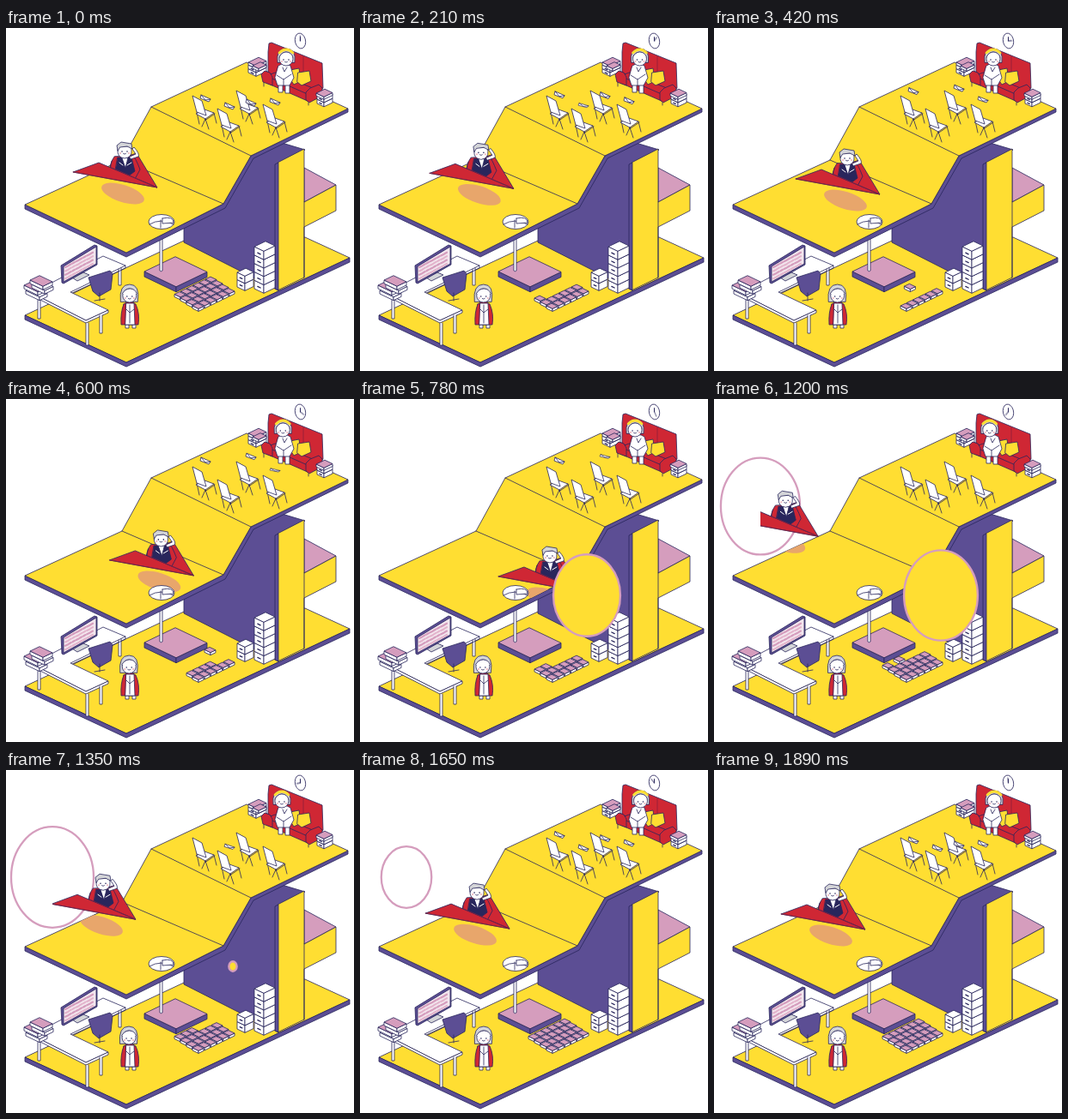
An HTML page that plays this animation: 405 px wide and 400 px high, repeating every 1.92 s.

```html
<!DOCTYPE html>
<html lang="en">
<head>
<meta charset="utf-8">
<title>Isometric office</title>
<style>
html, body { margin: 0; width: 100%; height: 100%; overflow: hidden; background: #fff; }
svg { display: block; width: 405px; height: 400px; }
.ink { fill: none; stroke: #29265c; stroke-width: .8; stroke-linecap: round; stroke-linejoin: round; }
.minute { animation: turn 1.92s linear infinite; }
@keyframes turn { to { transform: rotate(360deg); } }
</style>
</head>
<body>
<svg id="stage" viewBox="0 0 405 400" xmlns="http://www.w3.org/2000/svg"></svg>
<script>
const LOOP = 1920, STEP = 30;
const YELLOW = '#ffde32', PURPLE = '#5c4e94', PINK = '#d59dbd', RED = '#cf2734',
      INK = '#29265c', WHITE = '#fff', GREY = '#d4d5d8', ORANGE = '#e8a66b';
const SLAB = '22,206 135,154 169,92 280,40 398,94 285,149 253,205 140,262';

const poly = (pts, fill, line = INK, w = .8) =>
  `<polygon points="${pts}" fill="${fill}" stroke="${line}" stroke-width="${w}" stroke-linejoin="round"/>`;
const path = (d, fill = 'none', line = INK, w = .8) =>
  `<path d="${d}" fill="${fill}" stroke="${line}" stroke-width="${w}" stroke-linecap="round" stroke-linejoin="round"/>`;
const oval = (x, y, rx, ry, fill, line = INK, w = .8) =>
  `<ellipse cx="${x}" cy="${y}" rx="${rx}" ry="${ry}" fill="${fill}" stroke="${line}" stroke-width="${w}"/>`;
const group = (x, y, body, id = '') => `<g ${id && `id="${id}"`} transform="translate(${x} ${y})">${body}</g>`;

// Isometric box: left corner at x,y; a runs down-right, b runs up-right, h goes down.
function box(x, y, a, b, h, top = WHITE, left = WHITE, right = left) {
  const k = .48;
  const p = (u, v, d = 0) => `${x + u + v},${y + k * (u - v) + d}`;
  return poly([p(0, 0), p(a, 0), p(a, 0, h), p(0, 0, h)].join(' '), left) +
    poly([p(a, 0), p(a, b), p(a, b, h), p(a, 0, h)].join(' '), right) +
    poly([p(0, 0), p(0, b), p(a, b), p(a, 0)].join(' '), top);
}

function cabinet(x, y, a, b, h, drawers) {
  let s = '';
  for (let i = drawers - 1; i >= 0; i--) {
    const d = h / drawers, yy = y + i * d;
    s += box(x, yy, a, b, d);
    s += path(`M${x + a * .35} ${yy + a * .25 + d * .45}l${a * .3} ${a * .15}`, 'none', INK, 1.3);
  }
  return s;
}

function face(x, y) {
  return `<g fill="${INK}"><circle cx="${x - 3}" cy="${y}" r=".8"/><circle cx="${x + 3}" cy="${y}" r=".8"/></g>` +
    `<g fill="#efb6bd"><circle cx="${x - 5}" cy="${y + 2}" r="1.1"/><circle cx="${x + 5}" cy="${y + 2}" r="1.1"/></g>` +
    path(`M${x - 1.5} ${y + 2.5}q1.5 1.4 3 0`);
}

function building() {
  return poly('22,335 207,248 348,244 400,268 140,390', YELLOW) +
    poly('22,335 140,390 400,268 400,273 140,395 22,340', PURPLE) +
    poly('207,226 252,206 285,149 318,133 348,142 317,158 317,306 207,250', PURPLE) +
    poly('347,163 384,183 347,203', PINK) +
    poly('316,157 347,141 347,203 384,183 384,213 347,232 347,291 316,306', YELLOW) +
    poly('313,159 317,157 317,306 313,304', PURPLE) +
    path('M347 203V291');
}

function slab() {
  return poly('22,206 140,262 253,205 285,149 398,94 398,98 288,152 255,210 140,267 22,211', PURPLE) +
    poly(SLAB, YELLOW) + path('M135 154L253 205M169 92L285 149');
}

function desk() {
  const leg = (x, y, h) => path(`M${x} ${y}v${h}h3v-${h}`, WHITE);
  let dashes = '';
  for (let r = 0; r < 4; r++)
    for (let c = 0; c < 8; c++)
      dashes += path(`M${69 + c * 4.2} ${279 + r * 4.4 - c * 2.25}l${c % 3 ? 2.6 : 3.2} -1.5`, 'none', r % 2 ? '#e3b4cc' : PINK, 2.2);
  const chair = poly('96,291 121,283 124,287 122,305 108,313 101,307', PURPLE) + path('M109 309V318M103 318L115 316');
  return leg(131, 278, 22) + leg(37, 312, 27) +
    poly('30,309 113,266 139,277 75,308 119,329 93,341', WHITE) +
    poly('30,309 93,341 119,329 119,332 93,344 30,312', WHITE) +
    path('M139 277v3L79 309') + chair +
    leg(109, 335, 21) + leg(93, 344, 26) +
    poly('77,291 90,285 97,288 83,295', GREY) +
    poly('64,277 103,253 106,254 106,276 67,298 65,297', PURPLE) +
    poly('67,278 105,255 105,275 67,296', '#f3e6ee') + dashes +
    box(23, 306, 16, 9, 4, WHITE) + box(21, 300, 16, 11, 4, PINK) +
    box(30, 299, 15, 10, 4, WHITE) + box(28, 294, 15, 11, 4, PINK);
}

function visitor() {
  return path('M139 340v10h4v-9M147 341v9h4v-10', WHITE) +
    path('M137 322Q144 316 151 322Q156 333 154 346H134Q133 332 137 322Z', RED) +
    path('M140 321H149L150 346H139Z', WHITE) + path('M144 323v21M140 328l4 4 5-4') +
    group(0, 0, path('M133 319Q131 299 143.500 299Q156 299 153 319Z', GREY) +
      oval(143.500, 312, 8, 8, WHITE) +
      path('M135 310Q138 304 144 304Q150 304 152 310', WHITE) + face(143.500, 313), 'visitorHead');
}

function sofa() {
  return cabinet(282, 43, 9, 12, 9, 2) + box(282, 40, 9, 12, 3, PINK) + box(287, 44, 7, 9, 3, PINK) +
    poly('305,28 306,18 309,17 368,41 369,70 363,77 305,52', RED) +
    path('M325 24V53M346 33V63', 'none', '#8d1f3b') +
    poly('303,56 313,52 364,73 353,83', RED) +
    poly('303,56 353,78 353,86 303,64', RED) +
    poly('297,54 301,50 307,52 310,57 310,67 299,63', RED) +
    poly('349,75 354,70 364,66 368,70 368,79 353,87 349,84', RED) +
    path('M300 64v4M352 87v3M366 80v3') +
    path('M331 49l10-2 2 15-8 4-4-6Z', YELLOW) + path('M340 52l13-2 2 12-11 5-5-4Z', YELLOW) +
    cabinet(362, 78, 8, 10, 10, 2) + box(361, 76, 9, 10, 3, PINK);
}

function sitter() {
  return path('M317 62v13h5V63M325 64v12h5V62', WHITE) +
    path('M317 44Q324 39 331 44L335 58 330 67H316L313 58Z', WHITE) +
    path('M315 55L323 60 332 54M322 46l2 5 3-5M323 60v7') +
    group(0, 0, path('M314 40Q312 24 324 24Q336 24 334 40Z', GREY) +
      path('M316 29Q324 21 332 29', 'none', YELLOW, 2.6) +
      oval(324, 36, 8, 8, WHITE) + path('M316 34Q319 28 324 28Q330 28 332 34', WHITE) + face(324, 37), 'sitterHead');
}

function clock() {
  return `<g transform="translate(342.500 15) skewY(12)">${oval(0, 0, 6.2, 8.8, WHITE)}` +
    `${path('M0 0V-4.500', 'none', INK, 1)}<g transform="scale(.72 1)"><g class="minute">${path('M0 0V-6', 'none', INK, 1)}</g></g></g>`;
}

const seat = (x, y) => group(x, y,
  path('M5 19L8 33M15 27L19 39M25 20L28 32M15 27L11 36') +
  poly('4,21 14,16 25,20 15,27', WHITE) + poly('0,0 11,6 16,23 5,19', WHITE) + path('M15 27v1.500L26 21'));

function pilot() {
  return poly('152,146 176,186 120,166 123,155', RED) +
    path('M126 150Q120 158 122 170L149 178L156 165Q151 152 148 149Z', RED) +
    path('M130 151H146L150 167L142 173L127 168Z', INK) +
    path('M135 151h7l-3 12Z', WHITE) + path('M137 153l3 2M132 157l4 3M141 160l5-3', 'none', WHITE, 1) +
    path('M145 153L154 150Q156 147 149 139L147 141L151 147L144 150Z', WHITE) +
    path('M130 142Q129 151 138 152Q147 151 146 142L145 138H131Z', WHITE) +
    path('M130 143L129 137L134 133L146 135L147 141L141 138L133 139Z', GREY) +
    face(138, 144) +
    poly('78,168 108,157 176,186', RED) + path('M78 168L176 186L123 163', 'none', '#7d2146');
}

const chairs = [[268, 73], [217, 79], [299, 89], [246, 94]];
// x, resting y, raised y, fade-out time, return time
const notes = [[232, 82, 72, 1110, 1530], [260, 91, 89, 360, 1290], [285, 87, 67, 900, 1440], [313, 86, 83, 690, 1410]];
const cells = [];
for (let r = 3; r >= 0; r--) for (let c = 5; c >= 0; c--) cells.push({ i: r * 6 + c, x: 223 + c * 7.2 - r * 7, y: 324 - c * 3.5 - r * 4.5 });

document.getElementById('stage').innerHTML = `<defs>
  <clipPath id="gate"><rect id="gateBox" y="0" height="400"/></clipPath>
  <clipPath id="deck"><polygon points="${SLAB}"/></clipPath>
  <g id="pack">${box(-6, 0, 7, 6, 3, PINK)}</g>
  <g id="note">${poly('-5,-4 6,1 4,4 -6,0', WHITE)}${path('M-5-4L0 2L6 1')}</g></defs>` +
  building() +
  box(161, 284, 37, 36, 6, PINK, PURPLE) +
  path('M179 240V283q1.500 1.500 3 0V240', WHITE) +
  desk() + visitor() +
  cells.map(c => `<use id="cell${c.i}" href="#pack"/>`).join('') +
  cabinet(269, 285, 9, 10, 17, 2) + cabinet(289, 255, 11, 13, 49, 5) +
  slab() +
  `<g clip-path="url(#gate)"><g clip-path="url(#deck)"><g id="shade"><ellipse cx="136" cy="193" rx="26" ry="10" transform="rotate(18 136 193)" fill="${ORANGE}"/></g></g></g>` +
  oval(181, 226, 15, 8.5, WHITE) + path('M167 229Q180 221 195 229M180 233V224') +
  path('M182 222v6l13-1Q195 219 182 222', WHITE) +
  clock() + sofa() + sitter() +
  chairs.map(c => seat(...c)).join('') +
  notes.map((n, i) => `<use id="note${i}" href="#note"/>`).join('') +
  oval(54, 125, 0, 0, 'none', PINK, 2.3).replace('<ellipse', '<ellipse id="exit"') +
  `<g clip-path="url(#gate)"><g id="plane">${pilot()}</g></g>` +
  oval(264, 229, 0, 0, YELLOW, PINK, 2.3).replace('<ellipse', '<ellipse id="entry"');

const el = id => document.getElementById(id);
const clamp = v => Math.min(1, Math.max(0, v));
const show = (node, on) => node.setAttribute('visibility', on ? 'visible' : 'hidden');

function mix(keys, t) {
  let k = 1;
  while (k < keys.length - 1 && t > keys[k][0]) k++;
  const [t0, a] = keys[k - 1], [t1, b] = keys[k];
  return a + (b - a) * clamp((t - t0) / (t1 - t0));
}

function portal(id, t, open, close) {
  const grow = 1 - (1 - clamp((t - open) / 240)) ** 2;
  const shrink = 1 - clamp((t - close) / 240) ** 2;
  const r = 48 * grow * shrink, node = el(id);
  node.setAttribute('rx', r);
  node.setAttribute('ry', r * 1.225);
  show(node, r > .3);
}

function fly(t) {
  const leaving = t < 1005;
  const dx = leaving ? 17 * (t / 420) ** 2.56 : -25 * (Math.max(0, 1900 - t) / 550) ** 3.25;
  const move = `translate(${dx} ${dx * .47})`;
  el('plane').setAttribute('transform', move);
  el('shade').setAttribute('transform', move);
  el('gateBox').setAttribute('x', leaving ? 0 : 54);
  el('gateBox').setAttribute('width', leaving ? 264 : 351);
}

const fill = [[0, 24], [60, 24], [330, 4], [420, 6.4], [780, 14], [1020, 18.3], [1350, 21], [1590, 24], [LOOP, 24]];
function stack(t) {
  const n = mix(fill, t), growing = t > 330;
  for (const c of cells) {
    const node = el('cell' + c.i), k = growing ? clamp(n - c.i) : 1;
    show(node, c.i < n);
    node.setAttribute('transform', `translate(${235 + (c.x - 235) * k} ${289 + (c.y - 289) * k})`);
  }
}

function post(t) {
  notes.forEach(([x, low, high, gone, back], i) => {
    const up = t < gone ? clamp(t / 500) : 1 - clamp((t - back) / 330);
    const flat = t < gone ? 1 - .65 * clamp((t - gone + 330) / 330) : .35 + .65 * clamp((t - back) / 90);
    const node = el('note' + i);
    show(node, t < gone || t >= back);
    node.setAttribute('transform', `translate(${x} ${low + (high - low) * up}) scale(1 ${flat})`);
  });
}

const sway = [[0, 2], [420, 1], [750, -4], [1020, -3.5], [1380, -3], [1650, 2.5], [LOOP, 2]];
function draw(now) {
  const t = Math.floor((now % LOOP) / STEP) * STEP;
  fly(t);
  portal('entry', t, 644, 1122);
  portal('exit', t, 1008, 1500);
  stack(t);
  post(t);
  el('sitterHead').setAttribute('transform', `translate(${mix(sway, t)} 0)`);
  el('visitorHead').setAttribute('transform', `translate(${mix(sway, t) * .15} 0)`);
  requestAnimationFrame(draw);
}
draw(0);
</script>
</body>
</html>
```
